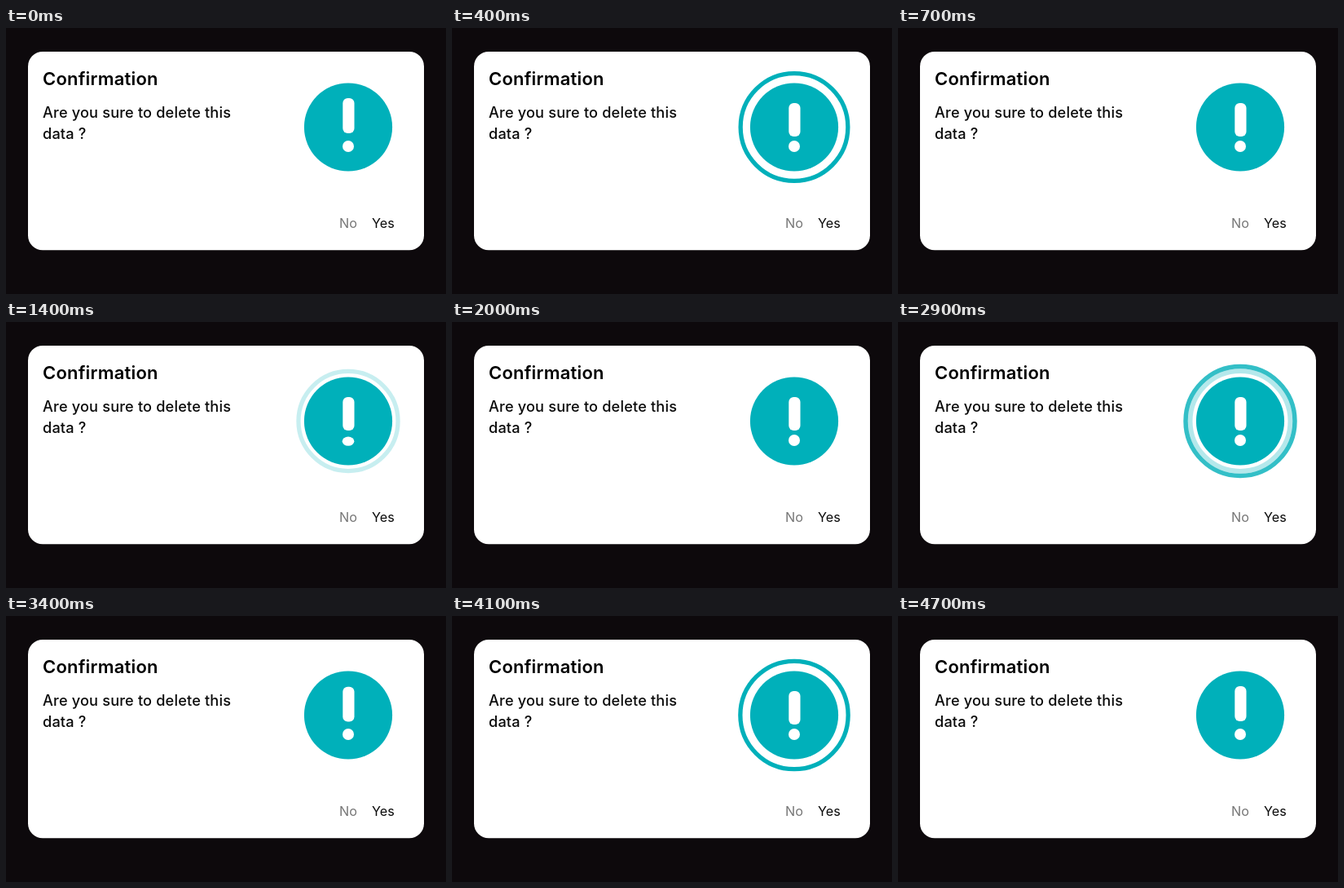
Write an HTML page with a canvas that moves like this. It is 540x326 px and loops after 4800 ms.

```html
<!DOCTYPE html>
<html lang="en">
<head>
<meta charset="utf-8">
<title>Confirmation</title>
<style>
  html, body { margin: 0; width: 100%; height: 100%; overflow: hidden; background: #0d090c; }
  canvas, svg { position: absolute; left: 0; top: 0; width: 540px; height: 326px; }
  text { font-family: Inter, "Open Sans", sans-serif; font-size: 18.2px; font-weight: 500; letter-spacing: .15px; fill: #0b0b0b; }
  .title { font-size: 22px; font-weight: 600; letter-spacing: .2px; fill: #000; }
  .button { font-size: 16.2px; font-weight: 400; letter-spacing: 0; }
  .muted { fill: #777; }
</style>
</head>
<body>
<canvas id="stage" width="540" height="326"></canvas>
<svg viewBox="0 0 540 326">
  <text class="title" x="45" y="70">Confirmation</text>
  <text x="45" y="109.5">Are you sure to delete this</text>
  <text x="45" y="135.5">data ?</text>
  <text class="button muted" x="409" y="245">No</text>
  <text class="button" x="449" y="245">Yes</text>
</svg>
<script>
const ctx = document.getElementById('stage').getContext('2d');
const TEAL = '#00b0ba';
const CX = 420, CY = 121.5;
const LOOP = 4800, STEP = 100, BEAT = 1230, IMPACT = 1400;

const linear = (p, from, to) => Math.min(1, Math.max(0, (p - from) / (to - from)));
const smooth = (p, from, to) => {
  const k = linear(p, from, to);
  return k * k * (3 - 2 * k);
};

function box(x, y, w, h, r, color) {
  ctx.fillStyle = color;
  ctx.beginPath();
  ctx.roundRect(x, y, w, h, r);
  ctx.fill();
}

function oval(x, y, rx, ry, color) {
  ctx.fillStyle = color;
  ctx.beginPath();
  ctx.ellipse(x, y, rx, ry, 0, 0, Math.PI * 2);
  ctx.fill();
}

function ring(inner, outer, alpha) {
  ctx.globalAlpha = alpha;
  ctx.strokeStyle = TEAL;
  ctx.lineWidth = outer - inner;
  ctx.beginPath();
  ctx.arc(CX, CY, (inner + outer) / 2, 0, Math.PI * 2);
  ctx.stroke();
  ctx.globalAlpha = 1;
}

// The ring spreads from the impact; a pale echo follows as it fades.
function drawPulse(p) {
  const fade = linear(p, 240, 390);
  const outer = 63.7 + 9.3 * smooth(p, 0, 450);
  const inner = outer - 5.3 - fade;
  ring(inner, outer, (0.22 + 0.78 * smooth(p, 0, 150)) * (1 - fade));
  ring(58.5, inner, 0.5 * Math.sin(Math.PI * fade));
}

// The bar lifts, hangs, then drops onto the dot and squashes it.
function drawMark(p) {
  const lift = smooth(p, 610, 820) * (1 - smooth(p, 1080, BEAT));
  const squash = 1 - smooth(p, 0, 150) + smooth(p, 1150, BEAT);
  const top = 92 - 6 * lift;
  const bottom = 133 - 4 * lift;
  box(413.3, top, 14.2, bottom - top, 6, '#fff');
  oval(CX, 145 + 1.2 * squash, 7 + 0.3 * squash, 7 - 1.4 * squash, '#fff');
}

function draw(t) {
  const p = (t - IMPACT + 2 * BEAT) % BEAT;
  ctx.fillStyle = '#0d090c';
  ctx.fillRect(0, 0, 540, 326);
  box(27, 29, 486, 243.3, 18, '#fff');
  drawPulse(p);
  oval(CX, CY, 54.1, 54.1, TEAL);
  drawMark(p);
}

function frame(now) {
  draw(Math.floor(now % LOOP / STEP) * STEP);
  requestAnimationFrame(frame);
}
draw(0);
requestAnimationFrame(frame);
</script>
</body>
</html>
```
